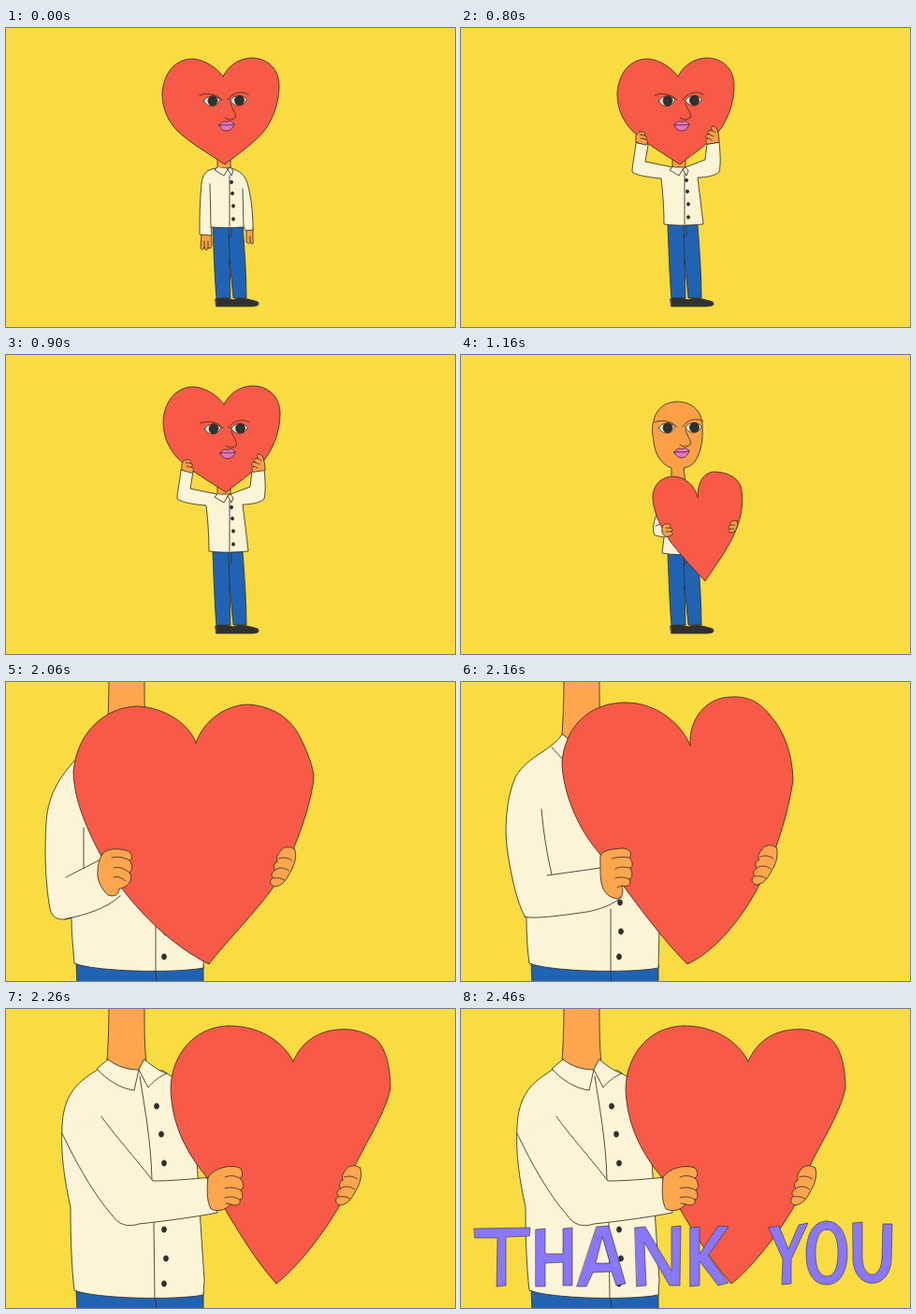
Write an HTML page that moves like this. It is 480 px wide and 320 px high and loops after 3960 ms.

```html
<!DOCTYPE html>
<html lang="en">
<head>
<meta charset="utf-8">
<title>Thank you</title>
<style>
html, body { margin: 0; width: 100%; height: 100%; overflow: hidden; background: #f9dc42; }
svg { display: block; width: 100vw; height: 100vh; }
g.scene { display: none; }
g.on { display: inline; }
</style>
</head>
<body>
<svg id="stage" viewBox="0 0 480 320" fill="none" stroke="#383024" stroke-width=".85" stroke-linejoin="round" stroke-linecap="round"></svg>
<script>
const RED = '#f75a46', BLUE = '#2063b4', CREAM = '#fbf4d7', SKIN = '#fca048', GLOW = '#fea64e',
      PURPLE = '#8877ff', PINK = '#e873c4', DARK = '#30302f', WHITE = '#fdf7e6';
const LOOP = 3960;

const shape = (fill, d) => `<path fill="${fill}" d="${d}"/>`;
const line = d => shape('none', d);
const move = (x, y, s) => `<g transform="translate(${x} ${y})">${s}</g>`;
const dots = (rx, ry, ...pts) => pts.map(([x, y]) =>
  `<ellipse cx="${x}" cy="${y}" rx="${rx}" ry="${ry}" fill="${DARK}"/>`).join('');

// Small figure
const legs =
  shape(BLUE, 'M221 211 C222 238 223 266 225 290 L240 289 L239 248 L243 289 L257 289 C257 264 255 237 253 211Z') +
  line('M238 212 L239 250 M241 212 L241 222 L238 224') +
  shape(DARK, 'M224 290 C230 288 238 289 243 291 C250 287 262 291 269 293 C272 297 268 298 260 298 L244 298 L225 298Z');

const eye = (x, y) =>
  shape(WHITE, `M${x - 9} ${y} C${x - 6} ${y - 6} ${x + 4} ${y - 7} ${x + 8} ${y - 1} C${x + 6} ${y + 7} ${x - 5} ${y + 8} ${x - 9} ${y}Z`) +
  dots(5, 5.3, [x + .5, y]);
const face = eye(220.5, 78) + eye(249, 77.5) +
  line('M207 72 C214 69 224 70 231 77 M237 77 C241 70 251 66 259 71') +
  line('M240 80 C241 87 247 91 245 96 C241 99 237 98 234 96') +
  shape(PINK, 'M228 104 C231 100 234 99 236 101 C239 98 242 100 244 103 C242 108 239 110 236 110 C232 110 230 108 228 104Z') +
  line('M228 104 C233 103 239 105 244 103');

const head = shape(SKIN, 'M225 136 L225 121 C214 117 207 106 206 92 C204 82 204 77 206 70 C209 56 220 50 231 50 C246 50 257 59 258 74 C259 90 257 104 250 114 C246 119 242 120 238 121 L240 136Z') + face;

const neck = shape(SKIN, 'M226 138 L226 150 L234 158 L240 150 L240 138Z');
const collar = shape(CREAM, 'M226 149 L223 152 L233 158 L237 151 L240 149 L243 153 L241 158 L237 151');
const front = line('M239 158 L239 212') + dots(1.5, 1.8, [241, 165], [242, 177], [243, 190.5], [243, 204.5]);

const heartFace = shape(RED, 'M232 52 C226 43 213 34 200 33 C178 33 168 52 167 70 C167 88 174 100 183 110 C198 124 216 134 234 146 C250 133 268 122 279 106 C287 93 292 78 292 62 C292 45 281 32 262 32 C246 33 236 43 232 52Z') + face;
const heartHeld = shape(RED, 'M253 152 C250 140 240 130 226 130 C211 131 205 142 205 153 C206 172 215 185 224 200 C236 215 248 229 261 242 C272 225 288 205 296 182 C301 167 302 152 299 140 C294 129 282 125 270 125 C260 126 253 135 253 152Z');
const heartSway = shape(RED, 'M260 153 C257 140 245 130 231 129 C217 130 210 141 210 155 C211 172 219 182 226 193 C236 212 248 228 264 240 C274 228 290 208 300 185 C305 170 307 152 303 142 C297 129 284 124 274 125 C265 127 260 137 260 153Z');

const standing = legs +
  shape(SKIN, 'M209 221 L208 235 C209 238 211 238 212 234 L213 237 C215 238 216 237 216 235 L218 236 C221 234 220 228 219 221Z') +
  line('M212 228 L212 234 M216 228 L216 235') +
  shape(SKIN, 'M257 215 L257 229 C259 231 260 231 261 229 C263 233 265 231 264 227 L264 214Z') + line('M261 223 L261 229') +
  neck +
  shape(CREAM, 'M225 150 C214 151 210 157 209 167 C207 185 207 203 207 221 L220 222 L219 213 C231 214 243 214 254 213 L256 217 L264 216 C264 197 262 180 258 166 C255 157 250 153 241 150Z') +
  line('M218 167 L219 213 M253 172 L254 213') + collar + front;

const raisedBody = legs + neck +
  shape(CREAM, 'M187 123 C186 135 183 146 183 154 C188 158 202 160 214 161 C216 178 217 195 217 210 C232 212 246 211 259 210 C257 193 255 176 253 160 C262 160 272 158 276 154 C278 144 277 133 276 122 L263 124 L261 141 L240 149 L226 149 L197 143 L200 125Z') +
  collar + move(0, -2, front);
const raisedHands =
  shape(SKIN, 'M187 122 C186 115 188 111 193 111 C197 111 197 113 196 115 C199 116 199 118 197 119 C200 120 200 123 198 125Z') + line('M191 114 L196 115 M192 118 L197 119') +
  shape(SKIN, 'M276 122 C276 114 274 106 270 105 C267 105 267 108 269 110 C264 109 262 112 266 114 C261 113 260 117 264 118 C261 119 262 122 263 124Z') + line('M269 110 L272 112 M266 114 L270 116 M264 118 L268 120');

const leftHand = shape(SKIN, 'M215 189 C214 183 217 180 221 181 C225 181 225 183 223 185 C227 186 227 188 224 189 C227 190 227 193 224 193 C220 196 216 194 215 189Z') + line('M219 185 L223 185 M219 189 L224 189');
const rightHand = shape(SKIN, 'M295 178 C291 176 287 179 288 182 C285 183 286 186 288 186 C285 188 286 190 289 190 C294 190 297 182 295 178Z') + line('M288 182 L293 182 M288 186 L292 186');
const held = heartHeld + leftHand + rightHand;

const heldShirt = shape(CREAM, 'M211 167 C206 176 204 187 207 193 L217 195 L215 212 C225 214 238 214 250 213 L250 170Z') + line('M217 195 L224 193 M208 183 L217 179');
const swayShirt = shape(CREAM, 'M212 157 C208 168 207 180 209 190 C212 195 216 195 219 194 L215 211 C225 213 238 214 250 213 L250 165Z') + line('M219 194 L226 193 M212 181 L220 178');
const midShirt = shape(CREAM, 'M224 145 C210 150 200 160 197 172 C199 180 207 180 215 176 L217 211 C230 213 246 212 258 211 L254 150Z');

// Close view
const bigNeck = shape(GLOW, 'M110 -4 C110 20 109 42 108 56 L130 84 L150 58 C148 40 148 20 148 -4Z');
const bigPants = shape(BLUE, 'M75 300 L76 324 L211 324 L211 303Z') + line('M160 310 L161 320');
const hem = 'C95 310 180 312 211 306';
const buttons = (...pts) => dots(2.4, 3.1, ...pts);
const bigRight = shape(GLOW, 'M337 177 C332 173 324 174 321 180 C318 184 317 188 319 190 C314 192 314 197 317 199 C311 202 312 206 314 207 C309 211 311 216 316 217 C324 216 328 210 332 202 C337 195 340 183 337 177Z') +
  line('M320 187 C325 185 330 186 334 189 M318 198 C323 196 327 197 331 200 M314 208 C319 207 323 208 326 210');

const closeLeft = bigNeck + bigPants +
  shape(CREAM, 'M79 78 C60 98 45 118 43 150 C41 180 42 215 47 243 C50 253 55 254 63 254 L70 252 C70 270 72 287 73 301 ' + hem + ' L212 280 L140 100Z') +
  line('M63 254 C85 249 107 243 122 229 M64 209 L101 190 M83 156 L83 199 M160 255 L160 310') +
  buttons([171, 268], [169, 294]) +
  shape(RED, 'M203 65 C196 45 170 27 140 26 C105 27 75 55 72 97 C73 125 84 152 100 183 C120 222 162 274 217 302 C235 278 275 238 290 213 C305 190 328 130 329 100 C327 85 318 65 311 53 C300 35 280 25 258 24 C235 25 212 40 203 65Z') +
  shape(GLOW, 'M103 184 C108 177 122 178 131 181 C136 185 135 190 132 191 C136 196 135 201 132 204 C136 210 132 217 127 219 C124 221 122 221 121 221 C121 229 114 230 109 228 C101 221 97 210 98 203 C98 195 100 189 103 184Z') +
  line('M113 188 C120 186 127 188 132 191 M115 199 C121 197 127 200 132 204 M115 209 C121 207 125 211 128 213') +
  move(-28.5, 2, bigRight);

const closeMid = bigNeck + bigPants +
  shape(CREAM, 'M108 56 C98 73 72 78 58 102 C48 125 46 160 50 183 C54 210 60 235 68 251 L70 252 C70 270 71 287 73 301 ' + hem + ' L212 262 L150 90Z') +
  line('M68 251 C75 255 120 248 135 246 C150 243 163 238 172 230 M86 136 C88 160 92 185 97 206 M92 207 L149 199 M97 70 L108 82 M160 243 L160 310') +
  buttons([170, 236], [171, 267], [169, 294]) +
  shape(RED, 'M245 68 C236 45 210 23 178 22 C140 21 112 45 108 85 C108 110 120 150 146 181 C165 205 205 265 242 302 C272 288 302 252 321 213 C336 185 350 140 355 105 C354 75 345 52 330 35 C318 20 305 15 289 16 C262 16 243 40 245 68Z') +
  shape(GLOW, 'M149 186 C152 179 162 179 172 178 C180 178 184 184 180 188 C184 192 184 198 181 199 C184 206 183 210 180 211 C183 217 178 220 172 218 C174 224 173 231 167 232 C155 230 149 222 149 203Z') +
  line('M161 189 C168 187 175 187 180 188 M165 200 C170 197 175 198 181 199 M165 210 C170 208 175 209 180 211 M172 218 L167 220') +
  bigRight;

const closeRight = bigNeck + bigPants +
  shape(CREAM, 'M104 60 C92 72 62 78 60 125 C58 155 63 185 69 212 C69 245 70 275 73 301 ' + hem + ' L212 290 L207 215 L204 160 L185 78 L168 66 L141 66Z') +
  line('M143 72 C148 105 155 140 156 183 M158 229 L159 310') +
  shape(CREAM, 'M60 133 C75 165 95 200 113 220 C120 231 130 234 142 230 C170 227 200 223 226 218 L219 180 C200 182 175 184 157 184 C142 164 112 130 102 115') +
  shape(CREAM, 'M109 54 L97 64 C108 76 122 85 137 87 L142 65 C129 65 118 61 109 54Z') +
  shape(CREAM, 'M148 54 C156 61 165 67 172 69 C164 72 157 78 152 84 L142 65Z') +
  buttons([161, 104], [166, 134], [169, 165], [169, 236], [171, 267], [169, 294]) +
  shape(RED, 'M307 56 C295 33 270 18 238 18 C200 19 177 50 176 85 C177 120 190 150 213 178 C235 215 260 262 289 294 C306 281 336 247 358 208 C370 160 402 125 411 85 C411 60 405 40 395 32 C380 22 365 21 355 22 C330 24 315 38 307 56Z') +
  shape(GLOW, 'M216 180 C222 170 240 166 250 170 C254 174 253 180 250 181 C255 186 254 192 251 194 C254 199 253 203 250 204 C251 210 246 211 240 209 C235 216 225 217 219 214 C214 205 215 190 216 180Z') +
  line('M234 180 C240 177 246 179 250 181 M234 192 C240 190 246 191 251 194 M234 202 C240 200 245 201 250 204 M240 209 L235 208') +
  move(41.5, -7, bigRight);

const letters = [
  'M14 235 L74 234 L73 243 L48 244 L48 296 L38 297 L39 245 L15 245Z',
  'M80 236 L90 235 L90 262 L109 262 L109 235 L119 234 L119 296 L109 296 L109 271 L90 272 L90 297 L80 297Z',
  'M145 233 L158 232 L176 294 L166 296 L161 281 L141 282 L134 297 L124 297Z M151 244 L144 272 L159 272Z',
  'M186 234 L197 233 L225 280 L225 233 L235 232 L234 296 L223 296 L196 250 L198 296 L188 297Z',
  'M245 234 L255 233 L255 262 L275 232 L286 233 L264 264 L286 293 L275 296 L255 270 L255 296 L245 297Z',
  'M329 234 L340 232 L350 257 L361 231 L371 229 L353 268 L353 294 L343 295 L344 268Z',
  'M391 227 C406 227 413 243 413 261 C413 280 406 295 391 295 C376 295 369 281 369 262 C369 243 376 227 391 227Z M391 236 C382 236 379 249 379 262 C379 276 383 286 391 286 C400 286 403 275 403 261 C403 248 400 236 391 236Z',
  'M419 229 L429 228 L429 267 C430 290 449 290 450 267 L451 230 L461 230 L460 270 C457 302 421 301 419 269Z'
];
const lettering = `<g fill-rule="evenodd" stroke-width=".6" role="img" aria-label="THANK YOU">${letters.map(d => shape(PURPLE, d)).join('')}</g>`;

const scenes = [
  [0, standing + heartFace],
  [800, raisedBody + heartFace + raisedHands],
  [900, raisedBody + move(1, 1, heartFace + raisedHands)],
  [1080, legs + midShirt + head + move(-10, -42, held)],
  [1160, legs + heldShirt + head + held],
  [1960, legs + swayShirt + head + heartSway + move(4, -2, leftHand) + move(10, -1, rightHand)],
  [2060, closeLeft],
  [2160, closeMid],
  [2260, closeRight],
  [2460, closeRight + lettering]
];

const stage = document.getElementById('stage');
stage.innerHTML = '<rect x="-1" y="-1" width="482" height="322" fill="#f9dc42" stroke="none"/>' +
  scenes.map(([, art]) => `<g class="scene">${art}</g>`).join('');
const groups = [...stage.querySelectorAll('.scene')];

const start = performance.now();
function draw() {
  const t = Math.max(0, performance.now() - start) % LOOP;
  const now = scenes.findLastIndex(([at]) => t >= at);
  groups.forEach((g, i) => g.classList.toggle('on', i === now));
  requestAnimationFrame(draw);
}
draw();
</script>
</body>
</html>
```
